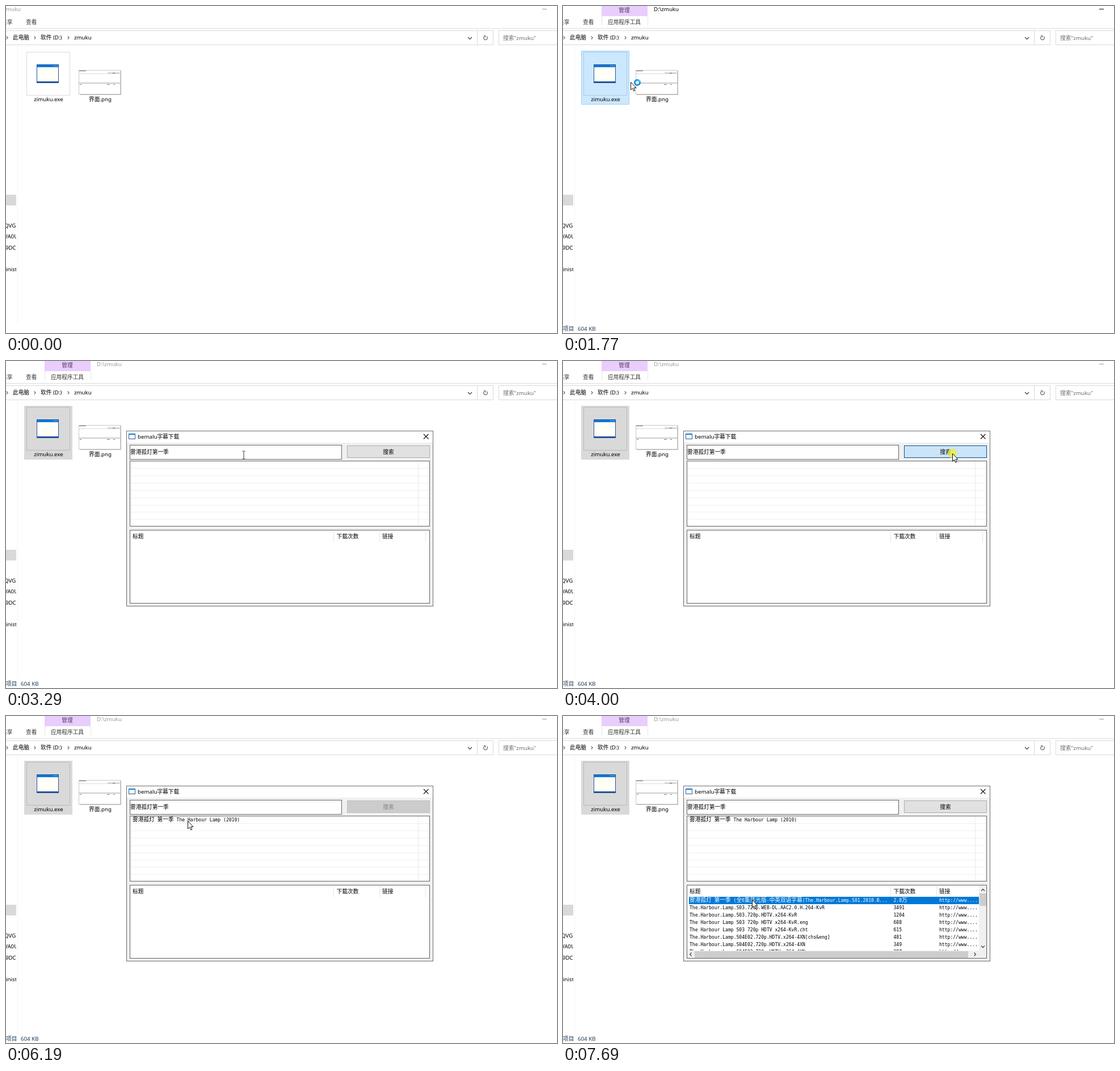
Animation, 971 px wide and 577 px high, one loop 8000 ms. Source, as an HTML page:

```html
<!DOCTYPE html>
<html lang="zh-CN">
<head>
<meta charset="utf-8">
<style>
html, body { margin: 0; width: 100%; height: 100%; overflow: hidden; background: #fff; }
svg { display: block; }
text { font: 9.7px "Noto Sans", "Noto Sans CJK SC", "Noto Sans CJK", sans-serif; white-space: pre; }
.mono { font: 8.07px "DejaVu Sans Mono", monospace; }
.mono tspan { font: 9.7px "Noto Sans CJK SC", "Noto Sans CJK", sans-serif; }
rect { shape-rendering: crispEdges; }
</style>
</head>
<body>
<svg id="stage" width="971" height="577" viewBox="0 0 971 577"></svg>
<script>
const LOOP = 8000;
const stage = document.getElementById('stage');

const text = (x, y, s, attrs = '') => `<text x="${x}" y="${y}" ${attrs}>${s}</text>`;
const centered = (x, y, s, attrs = '') => text(x, y, s, `text-anchor="middle" ${attrs}`);
const mono = (x, y, s, attrs = '') =>
  text(x, y, s.replace(/[\u4e00-\u9fff]+/g, '<tspan>$&</tspan>'), `class="mono" ${attrs}`);
const rect = (x, y, w, h, fill, attrs = '') =>
  `<rect x="${x}" y="${y}" width="${w}" height="${h}" fill="${fill}" ${attrs}/>`;
const box = (x, y, w, h, fill, stroke, attrs = '') =>
  rect(x + .5, y + .5, w, h, fill, `stroke="${stroke}" ${attrs}`);
const line = (d, color = '#555', width = 1.2) =>
  `<path d="${d}" fill="none" stroke="${color}" stroke-width="${width}"/>`;
const group = (id, body, attrs = '') => `<g id="${id}" ${attrs}>${body}</g>`;

const chevron = x => line(`M${x - 1.3} 53.5l2.5 2.5l-2.5 2.5`, '#666', 1.1);

const explorer = () =>
  group('shortTitle', text(-4.7, 9, 'zmuku')) +
  group('toolTab',
    rect(68, 0, 81, 18, '#e9cdfd') + centered(108, 10.5, '管理', 'fill="#4b3a58"') +
    centered(108, 31.5, '应用程序工具', 'fill="#333"') +
    rect(68, 18, 1, 16, '#e4e4e4') + rect(149, 18, 1, 16, '#e4e4e4') +
    text(160, 9, 'D:\\zmuku', 'id="pathTitle"')) +
  rect(945, 5, 8, 1, '#000', 'id="minimize"') +
  text(-8, 31.5, '共享', 'fill="#333"') + text(35, 31.5, '查看', 'fill="#333"') +
  rect(0, 39, 971, 1, '#dadbdc') +
  box(-2, 43, 860, 25, '#fff', '#d9d9d9') + rect(830, 44, 1, 24, '#d9d9d9') +
  box(868, 43, 110, 25, '#fff', '#d9d9d9') +
  [2, 51, 110].map(chevron).join('') +
  text(12, 59, '此电脑') + text(61, 59, '软件 (D:)') + text(120, 59, 'zmuku') +
  text(876, 59.5, '搜索"zmuku"', 'fill="#6d6d6d"') +
  line('M814 55l3.5 3.5l3.5 -3.5', '#555', 1.5) +
  line('M842.5 54a3.4 3.4 0 1 0 4.6 -.4M842 52.6h2.6v2.8', '#555', 1.1) +
  rect(20, 70, 1, 490, '#f4f4f4') + rect(0, 333, 18, 19, '#d9d9d9') +
  '<clipPath id="navClip"><rect width="18" height="577"/></clipPath><g clip-path="url(#navClip)">' +
  text(-3, 390.5, 'QVG') + text(-3, 410, 'VA0U') + text(-1, 429.5, '9DC') + text(0, 468, 'inist') + '</g>' +
  group('status', text(0, 573, '项目') + text(26, 573, '604 KB'), 'fill="#1e395b"');

const files = () =>
  box(32, 79, 84, 94, 'none', 'none', 'id="exeCell"') +
  box(36, 81, 76, 76, 'none', '#000', 'stroke-opacity=".14"') +
  rect(54, 103, 39, 33, '#24539a', 'rx="1"') + rect(55, 104, 37, 4, '#0d78d7') +
  rect(55, 108, 37, 25, '#fffff8') +
  [83, 86, 89].map(x => rect(x, 105, 1.5, 1, '#8cc4f5')).join('') +
  centered(75, 168, 'zimuku.exe') +
  rect(130, 114, 73, 43, '#bbb', 'rx="1"') + box(128, 113, 73, 42, '#fff', '#c9c9c9') +
  rect(129, 114, 12, 1, '#777') + rect(129, 119, 72, 1, '#ddd') + rect(179, 117, 21, 3, '#d5d5d5') +
  rect(188, 118, 4, 1, '#777') + rect(129, 135, 72, 2, '#ccc') +
  rect(130, 138, 3, 1, '#777') + rect(178, 138, 5, 1, '#777') + rect(189, 138, 3, 1, '#777') +
  centered(166, 168, '界面.png');

const SHOW = 'The.Harbour.Lamp', SPACED = 'The Harbour Lamp';
const rows = [
  [`雾港孤灯 第一季 (全6集蓝光版-中英双语字幕)${SHOW}.S01.2010.B...`, '2.8万'],
  [`${SHOW}.S03.720p.WEB-DL.AAC2.0.H.264-KvR`, '3491'],
  [`${SHOW}.S03.720p.HDTV.x264-KvR`, '1204'],
  [`${SPACED} S03 720p HDTV x264-KvR.eng`, '688'],
  [`${SPACED} S03 720p HDTV x264-KvR.cht`, '615'],
  [`${SHOW}.S04E02.720p.HDTV.x264-4XN[chs&amp;eng]`, '481'],
  [`${SHOW}.S04E02.720p.HDTV.x264-4XN`, '349'],
  [`${SHOW}.S04E02.720p.HDTV.x264-4XN`, '287'],
];
const listRow = ([title, count], i) => {
  const y = 328 + i * 12.93;
  return `<g ${i ? '' : 'id="firstRow"'}>` +
    mono(223, y, title) + mono(582.5, y, count) + mono(663, y, 'http://www....') + '</g>';
};

const dialog = () => group('dialog',
  box(212, 123, 540, 309, '#f0f0f0', '#6e6e6e') + rect(213, 124, 539, 20, '#fff') +
  box(216, 128, 11, 9, '#fffff8', '#2a5596') + rect(216, 128, 12, 2, '#0d78d7') +
  text(232, 136.5, 'bemalu字幕下载') + line('M736 129l8.5 8.5m0 -8.5l-8.5 8.5', '#111', 1.1) +
  box(218, 148, 373, 25, '#fff', '#646464') + text(219, 164, '雾港孤灯第一季', 'id="query"') +
  rect(0, 153, 1, 14, '#000', 'id="caret"') +
  box(601, 149, 145, 21, '#e1e1e1', '#adadad', 'id="button"') + centered(674, 164, '搜索', 'id="buttonText"') +
  box(218, 176, 528, 115, '#fff', '#646464') +
  Array.from({ length: 8 }, (_, i) => rect(219, Math.round(189 + i * 12.9), 527, 1, '#f0f0f0')).join('') +
  rect(726, 177, 1, 114, '#ececec') +
  rect(222, 177, 504, 12, '#0078d7', 'id="resultMark"') +
  mono(223, 186, `雾港孤灯 第一季 ${SPACED} (2010)`, 'id="result"') +
  box(218, 298, 528, 129, '#fff', '#646464') +
  [577, 658, 739].map(x => rect(x, 300, 1, 20, '#e5e5e5')).join('') +
  text(223, 313, '标题') + text(582.5, 313, '下载次数') + text(663, 313, '链接') +
  group('list',
    '<clipPath id="listClip"><rect x="219" y="319" width="514" height="95"/></clipPath>' +
    rect(222, 319, 511, 13, '#0078d7', 'id="rowMark"') +
    `<g clip-path="url(#listClip)">${rows.map(listRow).join('')}</g>` +
    rect(733, 299, 13, 128, '#f0f0f0') + rect(219, 414, 527, 13, '#f0f0f0') +
    rect(734, 313, 12, 22, '#cdcdcd') + rect(232, 415, 482, 12, '#cdcdcd') +
    line('M737 308.5l3 -3l3 3M737 405.5l3 3l3 -3M226.5 417.5l-3 3l3 3M724.5 417.5l3 3l-3 3', '#444', 1.3)));

const pointer = () =>
  '<circle id="click" r="8.5" fill="#eeee3c" opacity=".75"/>' +
  group('pointer',
    group('arrow', '<path d="M.5 .5V14L3.6 11.2L5.7 16L7.9 15L5.8 10.4H10Z" fill="#fff" stroke="#111"/>') +
    group('beam', line('M-2.5 -7h2l.5 .5l.5 -.5h2M0 -6.5v13M-2.5 7h2l.5 -.5l.5 .5h2', '#333', 1)) +
    group('busy', '<circle cx="12" cy="1" r="4.6" fill="#dff1fd" stroke="#1c91dc" stroke-width="3"/>' +
      '<circle id="spin" cx="12" cy="1" r="4.6" fill="none" stroke="#63bdf2" stroke-width="2" stroke-dasharray="6 23"/>'));

stage.innerHTML = explorer() + files() + dialog() + pointer();

const el = Object.fromEntries([...stage.querySelectorAll('[id]')].map(e => [e.id, e]));
const show = (id, on) => { el[id].style.display = on ? '' : 'none'; };
const set = (id, attrs) => { for (const k in attrs) el[id].setAttribute(k, attrs[k]); };

// time, x, y
const path = [
  [50, 560, 570], [700, 92, 126], [900, 89, 122], [1350, 89, 122], [1770, 119, 134],
  [2350, 337, 176], [2420, 337, 176], [2540, 348, 162], [2950, 348, 162], [3360, 425, 166],
  [3680, 600, 180], [3900, 686, 163], [4300, 686, 163], [5010, 438, 238], [5080, 405, 238],
  [5260, 405, 238], [6060, 320, 185], [6900, 320, 185], [7400, 333, 324], [LOOP, 333, 324],
];
const clicks = [[900, 1000], [1060, 1160], [2640, 2740], [3940, 4120], [6330, 6430], [6490, 6580], [7450, 7560]];

function pointerAt(t) {
  const i = Math.max(1, path.findIndex(p => p[0] >= t));
  const [t0, x0, y0] = path[i - 1], [t1, x1, y1] = path[i];
  const k = Math.max(0, (t - t0) / (t1 - t0)), e = k * k * (3 - 2 * k);
  return [x0 + (x1 - x0) * e, y0 + (y1 - y0) * e];
}

function draw(t) {
  const within = (a, b) => t >= a && t < b;
  const [x, y] = pointerAt(t);
  const opened = t >= 2100, tab = t >= 1420;
  const titleColor = t < 900 || opened ? '#999' : '#000';

  show('shortTitle', !tab);
  show('toolTab', tab);
  set('shortTitle', { fill: titleColor });
  set('pathTitle', { fill: titleColor });
  set('minimize', { fill: titleColor });
  show('status', t >= 900);
  const [cell, edge] = opened ? ['#d9d9d9', '#d9d9d9'] : t >= 900 ? ['#cce8ff', '#99d1ff']
    : t >= 640 ? ['#e5f3ff', '#e5f3ff'] : ['none', 'none'];
  set('exeCell', { fill: cell, stroke: edge });

  show('dialog', opened);
  const pasted = t >= 3050;
  show('query', pasted);
  show('caret', within(2650, 3900) && (t - 2650) % 1060 < 530);
  set('caret', { x: pasted ? 287 : 220 });

  const disabled = within(4300, 6700);
  const hover = t < 4300 && x > 601 && x < 747 && y > 149 && y < 171;
  const [face, border] = disabled ? ['#ccc', '#bfbfbf'] : within(3940, 4120) ? ['#cce4f7', '#005499']
    : hover ? ['#e5f1fb', '#0078d7'] : ['#e1e1e1', '#adadad'];
  set('button', { fill: face, stroke: border });
  set('buttonText', { fill: disabled ? '#838383' : '#000' });

  const resultOn = within(6350, 7450), rowOn = t >= 7450;
  show('result', t >= 4750);
  show('resultMark', resultOn);
  set('result', { fill: resultOn ? '#fff' : '#000' });
  show('list', t >= 6700);
  show('rowMark', rowOn);
  set('firstRow', { fill: rowOn ? '#fff' : '#000' });

  const beam = opened && x > 219 && x < 591 && y > 149 && y < 173;
  show('pointer', t >= 50);
  show('beam', beam);
  show('arrow', !beam);
  show('busy', within(1480, 2100));
  set('spin', { transform: `rotate(${t * .36} 12 1)` });
  set('pointer', { transform: `translate(${Math.round(x)} ${Math.round(y)})` });
  show('click', clicks.some(([a, b]) => within(a, b)));
  set('click', { cx: x, cy: y });
}

(function tick() {
  draw(performance.now() % LOOP);
  requestAnimationFrame(tick);
})();
</script>
</body>
</html>
```
